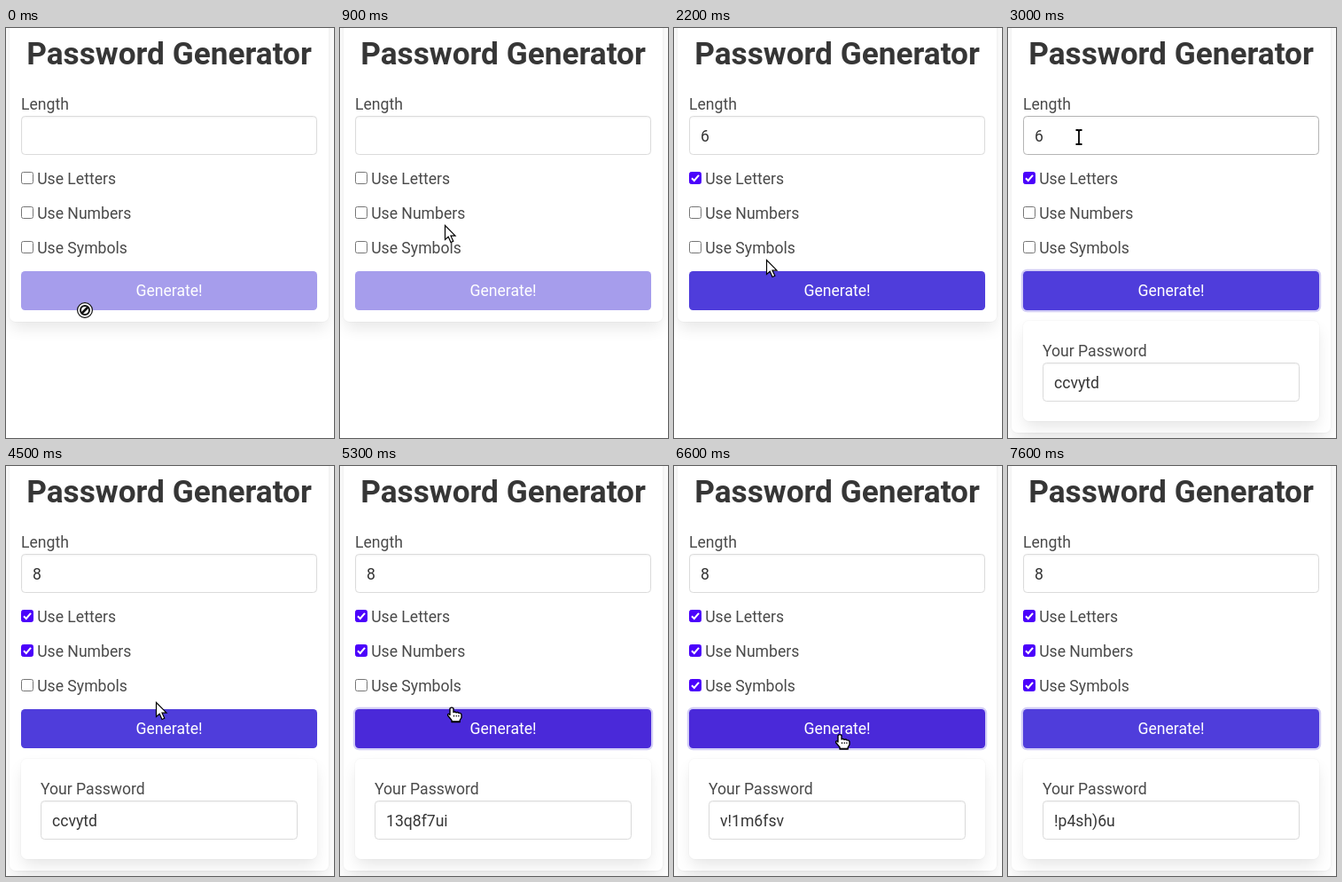
Animation, 370 px wide and 462 px high, one loop 9.2 s. Source, as an HTML page:

```html
<!DOCTYPE html>
<html lang="en">
<head>
<meta charset="utf-8">
<title>Password Generator</title>
<style>
  * { box-sizing: border-box; margin: 0; }
  html, body { width: 100%; height: 100%; overflow: hidden; background: #fff; }
  body { position: relative; font: 17.6px/24px Roboto, Arial, sans-serif; color: #4a4a4a; }
  body div, body h1, body svg { position: absolute; white-space: pre; }
  .box {
    background: #fff; border-radius: 6.6px;
    box-shadow: 0 8.8px 17.6px -2.2px rgba(10,10,10,.1), 0 0 0 1px rgba(10,10,10,.02);
  }
  #panel { left: 4px; top: -40px; width: 360px; height: 371px; }
  #panel.tall { height: 496px; }
  h1 { left: 4px; top: 8px; width: 360px; font-size: 35.2px; line-height: 42px; text-align: center; color: #363636; }
  .input {
    height: 44px; padding: 10px 12px; color: #363636;
    border: 1px solid #dbdbdb; border-radius: 4.4px;
    box-shadow: inset 0 1px 2px rgba(10,10,10,.05);
  }
  .input.hover { border-color: #b5b5b5; }
  .input.focus { border-color: #4f3ddb; box-shadow: 0 0 0 2.2px rgba(79,61,219,.25); }
  .input.focus.caret::after { content: ""; display: inline-block; width: 1px; height: 19px; background: #363636; vertical-align: -3px; }
  .input.selected span { background: #3390ff; color: #fff; }
  #length { left: 17px; top: 99px; width: 334px; }
  .check { left: 17px; width: 130px; height: 24px; }
  .check.hover { color: #363636; }
  .check svg { left: 0; top: 4px; }
  .check span { position: absolute; left: 18.2px; top: 0; }
  .check rect { fill: #fff; stroke: #767676; }
  .check path { fill: none; stroke: none; stroke-width: 2; }
  .check.on rect { fill: #4b02fb; stroke: #4b02fb; }
  .check.on path { stroke: #fff; }
  #button {
    left: 17px; top: 274px; width: 334px; height: 44px; line-height: 44px;
    border-radius: 4.4px; background: #4f3ddb; color: #fff; text-align: center;
  }
  #button.disabled { opacity: .5; }
  #button.hover, #button.press { background: #4a29d9; }
  #button.focus { box-shadow: 0 0 0 2.2px rgba(79,61,219,.25); }
  #result { left: 17px; top: 330px; width: 334px; height: 113px; }
  #password { left: 22px; top: 47px; width: 290px; }
  #cursor { left: 0; top: 0; width: 100%; height: 100%; }
  #cursor g { display: none; }
</style>
</head>
<body>
<div id="panel" class="box"></div>
<h1>Password Generator</h1>
<div style="left:17px;top:74px">Length</div>
<div id="length" class="input"><span></span></div>
<div id="button">Generate!</div>
<div id="result" class="box">
  <div style="left:22px;top:22px">Your Password</div>
  <div id="password" class="input"></div>
</div>
<svg id="cursor">
  <g id="arrow">
    <path d="M.5 .5V16.5L4.2 13.2L7 19.5L9.8 18.2L7 12.2H12Z" fill="#fff" stroke="#000" stroke-width="1.2"/>
  </g>
  <g id="hand">
    <path d="M-2 1.8Q0-.6 2 1.8V6Q4 4.9 5 6.5Q7 5.4 8 7Q10.2 6.4 11 8.6V12L9.2 15V17H0V15L-4.3 9.8Q-4.8 7.4-2.9 8L-2 9Z"
      fill="#fff" stroke="#000" stroke-width="1.4" stroke-linejoin="round"/>
    <path d="M2.5 9.2V11M5.2 9.2V11M7.9 9.2V11M0 16.2H9.2" stroke="#000" stroke-width="1.1"/>
  </g>
  <g id="beam">
    <path d="M-3.5-8H-1L0-7L1-8H3.5M0-7V7M-3.5 8H-1L0 7L1 8H3.5" fill="none" stroke="#fff" stroke-width="4"/>
    <path d="M-3.5-8H-1L0-7L1-8H3.5M0-7V7M-3.5 8H-1L0 7L1 8H3.5" fill="none" stroke="#000" stroke-width="1.8"/>
  </g>
  <g id="deny">
    <circle r="8.4" fill="#fff" stroke="#111" stroke-width="1.2"/>
    <circle r="5" fill="none" stroke="#111" stroke-width="2"/>
    <path d="M-3.5 3.5L3.5-3.5" stroke="#111" stroke-width="2.6"/>
  </g>
</svg>
<script>
const LOOP = 9200;
const $ = id => document.getElementById(id);

const checks = ["Letters", "Numbers", "Symbols"].map((name, i) => {
  const el = document.createElement("div");
  el.className = "check";
  el.style.top = 158 + 39 * i + "px";
  el.innerHTML = `<svg width="14" height="14"><rect x=".5" y=".5" width="13" height="13" rx="2"/>
    <path d="M3 7.2L5.8 10L11 3.8"/></svg><span>Use ${name}</span>`;
  document.body.insertBefore(el, $("button"));
  return el;
});

// Each step: time, cursor [kind, x, y] or null to keep it, changed state
const steps = [
  [0, ["deny", 89, 318], { length: "", on: 0, focus: "", password: "", press: false, selected: false }],
  [100, ["arrow", 97, 321]],
  [200, ["deny", 122, 314]],
  [300, ["deny", 146, 300]],
  [400, ["deny", 142, 303]],
  [500, ["deny", 135, 306]],
  [800, ["deny", 130, 288]],
  [900, ["arrow", 118, 222]],
  [1000, ["beam", 102, 134]],
  [1100, ["beam", 98, 124], { focus: "length" }],
  [1200, ["", 98, 124], { length: "6" }],
  [1300, ["beam", 92, 124]],
  [1400, ["beam", 70, 130]],
  [1500, ["arrow", 42, 147]],
  [1600, ["hand", 24, 160]],
  [1700, ["hand", 17, 156.5], { focus: "" }],
  [1800, ["hand", 16, 157], { on: 1 }],
  [1900, ["hand", 15, 159]],
  [2000, ["hand", 34, 172]],
  [2100, ["arrow", 72, 222]],
  [2200, ["arrow", 104, 261]],
  [2300, ["hand", 120, 286]],
  [2400, ["hand", 122, 289], { focus: "button", press: true }],
  [2500, ["hand", 122, 289], { press: false, password: "ccvytd" }],
  [2600, ["hand", 120, 284]],
  [2700, ["hand", 116, 276]],
  [2800, ["arrow", 102, 222]],
  [2900, ["beam", 86, 139]],
  [3000, ["beam", 80, 123]],
  [3100, ["beam", 8, 122], { focus: "length", selected: true }],
  [3200, ["", 8, 122], { length: "", selected: false }],
  [3400, null, { length: "8" }],
  [3500, ["beam", 68, 126]],
  [3600, ["beam", 56, 134]],
  [3700, ["arrow", 42, 149]],
  [3800, ["hand", 31, 182]],
  [3900, ["hand", 25, 202]],
  [4000, ["hand", 24, 204], { focus: "", on: 2 }],
  [4100, ["hand", 45, 207]],
  [4200, ["hand", 96, 214]],
  [4300, ["arrow", 136, 225]],
  [4400, ["arrow", 157, 249]],
  [4500, ["arrow", 169, 266]],
  [4700, ["hand", 165, 284]],
  [4800, ["hand", 160, 287], { focus: "button", press: true }],
  [4900, ["hand", 152, 284], { press: false, password: "x7d02kqa" }],
  [5200, ["hand", 136, 277], { press: true }],
  [5300, ["hand", 126, 271.5], { press: false, password: "13q8f7ui" }],
  [5400, ["hand", 84, 241]],
  [5600, ["hand", 72, 244], { focus: "", on: 3 }],
  [5700, ["arrow", 108, 262]],
  [5800, ["arrow", 150, 330]],
  [6000, ["hand", 186, 300]],
  [6100, ["hand", 198, 293], { focus: "button", press: true }],
  [6200, ["hand", 204, 291], { press: false, password: "k%9w2!ma" }],
  [6300, ["hand", 207, 290]],
  [6500, ["hand", 198, 296], { password: "v!1m6fsv" }],
  [6600, ["hand", 187, 302]],
  [6800, null, { press: true }],
  [6900, null, { press: false, password: "r$3t(z8e" }],
  [7000, null, { press: true }],
  [7100, null, { press: false, password: "!p4sh)6u" }],
  [7200, ["hand", 188, 301]],
  [7600, ["", 0, 0]]
];

const state = {};
const frames = steps.map(([time, cursor, change]) => {
  Object.assign(state, change);
  if (cursor) state.cursor = cursor;
  return { time, ...state };
});

const inside = (x, y, l, t, r, b) => x >= l && x <= r && y >= t && y <= b;

function draw(s) {
  const [kind, x, y] = s.cursor;
  const set = (el, flags) => {
    for (const name in flags) el.classList.toggle(name, Boolean(flags[name]));
  };

  const field = $("length");
  field.firstChild.textContent = s.length;
  const focused = s.focus === "length";
  set(field, { hover: kind === "beam", focus: focused, caret: focused && !s.selected, selected: s.selected });

  checks.forEach((el, i) => set(el, {
    on: i < s.on,
    hover: kind === "hand" && inside(x, y, 12, 156 + 39 * i, 142, 182 + 39 * i)
  }));

  const hover = kind === "hand" && inside(x, y, 17, 270, 351, 318);
  set($("button"), {
    disabled: !s.on, hover, press: s.press,
    focus: s.focus === "button" && !s.press
  });

  set($("panel"), { tall: s.password });
  $("result").style.display = s.password ? "block" : "none";
  $("password").textContent = s.password;

  for (const g of $("cursor").children) {
    g.style.display = g.id === kind ? "inline" : "none";
    g.setAttribute("transform", `translate(${x} ${y})`);
  }
}

let shown = null;
const start = performance.now();
function tick() {
  const t = (performance.now() - start) % LOOP;
  const frame = frames.findLast(f => f.time <= t) || frames[0];
  if (frame !== shown) draw(shown = frame);
  requestAnimationFrame(tick);
}
tick();
</script>
</body>
</html>
```
